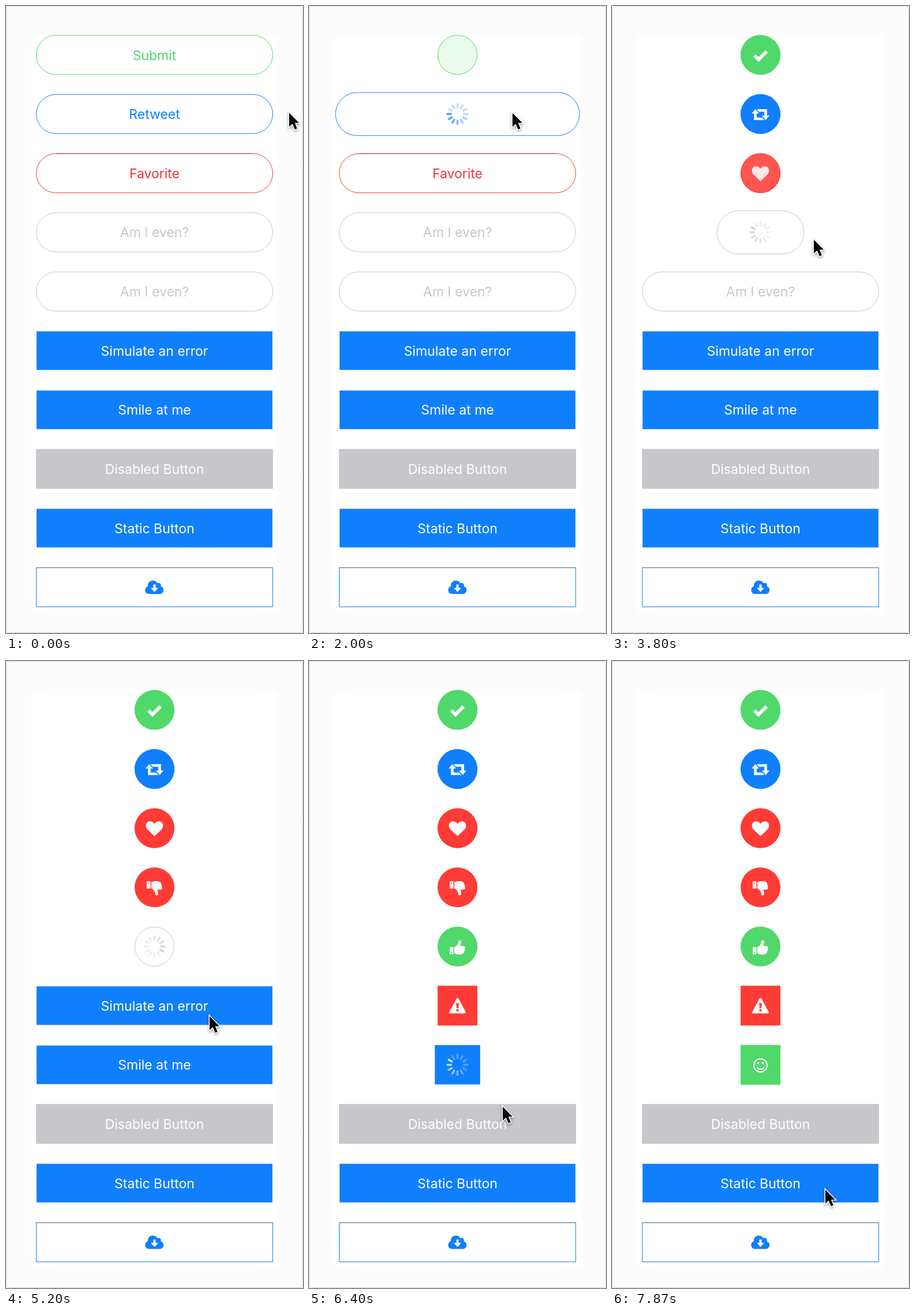
Animation, 515 px wide and 1088 px high, one loop 8000 ms. Source, as an HTML page with a canvas:

```html
<!DOCTYPE html>
<html lang="en">
<head>
<meta charset="utf-8">
<title>Animated buttons</title>
<style>
html, body { margin: 0; overflow: hidden; background: #fff; }
canvas { display: block; width: 515px; height: 1088px; }
</style>
</head>
<body>
<canvas id="stage" width="515" height="1088"></canvas>
<script>
const ctx = document.getElementById('stage').getContext('2d');
const LOOP = 8000, CX = 257.5, WIDE = 410, SIZE = 68;
const GREEN = '#50d86a', BLUE = '#107ffc', RED = '#ff3b35', GRAY = '#c7c7cc';

const clamp = x => Math.max(0, Math.min(1, x));
const smooth = x => (x = clamp(x), x * x * (3 - 2 * x));
const inOutCubic = x => x < .5 ? 4 * x ** 3 : 1 - 4 * (1 - x) ** 3;

function shape(d, color) {
  ctx.fillStyle = color;
  ctx.fill(new Path2D(d));
}
function line(d, color, width) {
  ctx.strokeStyle = color;
  ctx.lineWidth = width;
  ctx.stroke(new Path2D(d));
}

// Icons are drawn around (0, 0); bg is the color showing through holes.
function thumb(bg) {
  shape('M-13.5 0H-7V12.5H-13.5Z M-5.5 0C-2-1 0-5 1-7C1.5-9 1-12 3.5-12C7-12 7.5-7 4.5-2H10.5C13.5-2 14 1 12.5 2.5C13.5 4 13 6 11.5 7C12 9 11.5 10 10 10.5C10 13-1 14-5.5 11Z', '#fff');
  shape('M-11.8 8.5h2v2h-2Z', bg);
}
const icons = {
  check() { line('M-10.5 1L-3.5 8L10.5-6', '#fff', 6); },
  retweet() {
    shape('M-15.5-1L-9-8.5L-2.5-1H-6.7V6H3L6.5 10.5H-11.3V-1Z M15.5 2.5L9 10.5L2.5 2.5H6.7V-4H-3L-6.5-8.5H11.3V2.5Z', '#fff');
  },
  heart() {
    shape('M0 14L-12 2.5C-19-5-12-15-4-11Q-1.5-10 0-7.5Q1.5-10 4-11C12-15 19-5 12 2.5Z', '#fff');
  },
  down(bg) {
    ctx.scale(1, -1);
    ctx.translate(0, -2);
    thumb(bg);
  },
  up(bg) {
    ctx.translate(0, 1);
    thumb(bg);
  },
  warning(bg) {
    shape('M-1.7-12.2Q0-14 1.7-12.2L14.3 11Q15 13.5 12.5 13.5H-12.5Q-15 13.5-14.3 11Z', '#fff');
    shape('M-2.3-4.5H2.3L1.7 4.5H-1.7Z M-2 6.3H2V10H-2Z', bg);
  },
  smile() {
    line('M11.5 1A11.5 11.5 0 1 1-11.5 1A11.5 11.5 0 1 1 11.5 1Z M-6 4C-4 9.2 4 9.2 6 4', '#fff', 2);
    shape('M-2-3a2 2 0 1 1-4 0a2 2 0 1 1 4 0Z M6-3a2 2 0 1 1-4 0a2 2 0 1 1 4 0Z', '#fff');
  },
  cloud() {
    shape('M-9 11.5C-18 11.5-18 0-11.5-2C-12-9-6-12-2-11.5Q3-11.5 5-7C9-9 12.5-5 11-1.5C18 0 17 11.5 9 11.5Z', BLUE);
    shape('M-2-5H2V1H6.5L0 8L-6.5 1H-2Z', '#fff');
  }
};

// at: click time, to/icon: look after loading
const buttons = [
  { text: 'Submit', color: GREEN, at: 1030, to: GREEN, icon: 'check' },
  { text: 'Retweet', color: BLUE, at: 1888, to: BLUE, icon: 'retweet' },
  { text: 'Favorite', color: '#ee3733', top: '#777', at: 2700, to: RED, icon: 'heart' },
  { text: 'Am I even?', color: GRAY, at: 3615, to: RED, icon: 'down' },
  { text: 'Am I even?', color: GRAY, at: 4490, to: GREEN, icon: 'up' },
  { text: 'Simulate an error', color: BLUE, solid: true, at: 5235, to: RED, icon: 'warning' },
  { text: 'Smile at me', color: BLUE, solid: true, at: 6180, to: GREEN, icon: 'smile' },
  { text: 'Disabled Button', color: GRAY, solid: true, bleed: 1 },
  { text: 'Static Button', color: BLUE, solid: true },
  { color: BLUE, top: '#777', square: true, idleIcon: 'cloud' }
];

function spinner(age, color) {
  const head = Math.floor(age * 12 / 1000) + 8;
  ctx.save();
  ctx.lineCap = 'round';
  for (let i = 0; i < 12; i++) {
    ctx.save();
    ctx.rotate((head - i) * Math.PI / 6);
    ctx.globalAlpha = Math.max(.27, .78 - i * .085);
    line('M0-11.5V-17.5', color, 3.6);
    ctx.restore();
  }
  ctx.restore();
}

function box(w, h, radius) {
  ctx.beginPath();
  ctx.roundRect(-w / 2, -h / 2, w, h, radius);
}

function drawButton(b, row, t) {
  const age = b.at === undefined ? -1 : t - b.at;
  const scale = 1 + .1 * (smooth((age - 40) / 55) - smooth((age - 185) / 50));
  const w = (WIDE + (SIZE - WIDE) * inOutCubic(clamp((age - 60) / 200))) * scale;
  const h = SIZE * scale;
  const radius = b.solid || b.square ? 0 : h / 2;
  const done = clamp((age - 950) / 175);

  ctx.save();
  ctx.translate(CX, 84.8 + 102.65 * row);
  if (b.solid) {
    const bleed = b.bleed || -1;
    box(w + bleed, h + bleed, 0);
    ctx.fillStyle = b.color;
    ctx.fill();
  } else {
    box(w, h, radius);
    ctx.fillStyle = '#fff';
    ctx.fill();
    ctx.strokeStyle = b.color;
    ctx.lineWidth = 1;
    ctx.stroke();
    if (b.top && w > h) line(`M${radius - w / 2} ${-h / 2}H${w / 2 - radius}`, b.top, 1);
  }

  if (age < 0) {
    if (b.idleIcon) icons[b.idleIcon]();
    if (b.text) {
      ctx.fillStyle = b.solid ? '#fff' : b.color;
      ctx.fillText(b.text, 0, 8.7);
    }
  } else if (age < 900) {
    spinner(age, b.solid ? '#fff' : b.color);
  } else if (done > 0) {
    ctx.globalAlpha = done;
    box(w + 1, h + 1, b.solid ? 0 : radius + .5);
    ctx.fillStyle = b.to;
    ctx.fill();
    icons[b.icon](b.to);
  }
  ctx.restore();
}

// time, x, y of the pointer tip
const pointer = [
  [0, 490, 183], [870, 385, 77], [1200, 385, 77], [1860, 352, 182], [1960, 352, 182],
  [2650, 337, 293], [2820, 337, 293], [3550, 349, 403], [3820, 349, 403],
  [4450, 350, 508], [4560, 350, 508], [5180, 352, 614], [5300, 352, 614],
  [6130, 341, 715], [6390, 335, 771], [6930, 335, 771], [7730, 369, 915], [8000, 369, 915]
];

function drawPointer(t) {
  const i = pointer.findIndex(k => k[0] > t);
  const [t0, x0, y0] = pointer[i - 1], [t1, x1, y1] = pointer[i];
  const k = smooth((t - t0) / (t1 - t0));
  const arrow = 'M0 0V24L5.6 18.8L9.8 28.6L13.8 26.9L9.7 17.2H17Z';
  ctx.save();
  ctx.translate(x0 + (x1 - x0) * k + 1, y0 + (y1 - y0) * k + 2.5);
  ctx.shadowColor = 'rgba(0,0,0,.4)';
  ctx.shadowBlur = 4;
  ctx.shadowOffsetY = 2;
  line(arrow, '#fff', 3);
  ctx.shadowColor = 'transparent';
  shape(arrow, '#000');
  ctx.restore();
}

function drawBackdrop() {
  ctx.fillStyle = '#fcfcfc';
  ctx.fillRect(0, 0, 515, 1088);
  ctx.save();
  ctx.shadowColor = '#fff';
  ctx.shadowBlur = 20;
  ctx.fillStyle = '#fff';
  ctx.fillRect(44, 52, 427, 1000);
  ctx.restore();
  ctx.beginPath();
  ctx.roundRect(.5, .5, 514, 1087, 4);
  ctx.strokeStyle = '#d2d2d2';
  ctx.lineWidth = 1;
  ctx.stroke();
}

function frame() {
  const t = performance.now() % LOOP;
  ctx.font = '23px Inter, sans-serif';
  ctx.textAlign = 'center';
  drawBackdrop();
  buttons.forEach((b, row) => drawButton(b, row, t));
  drawPointer(t);
  requestAnimationFrame(frame);
}
frame();
</script>
</body>
</html>
```
